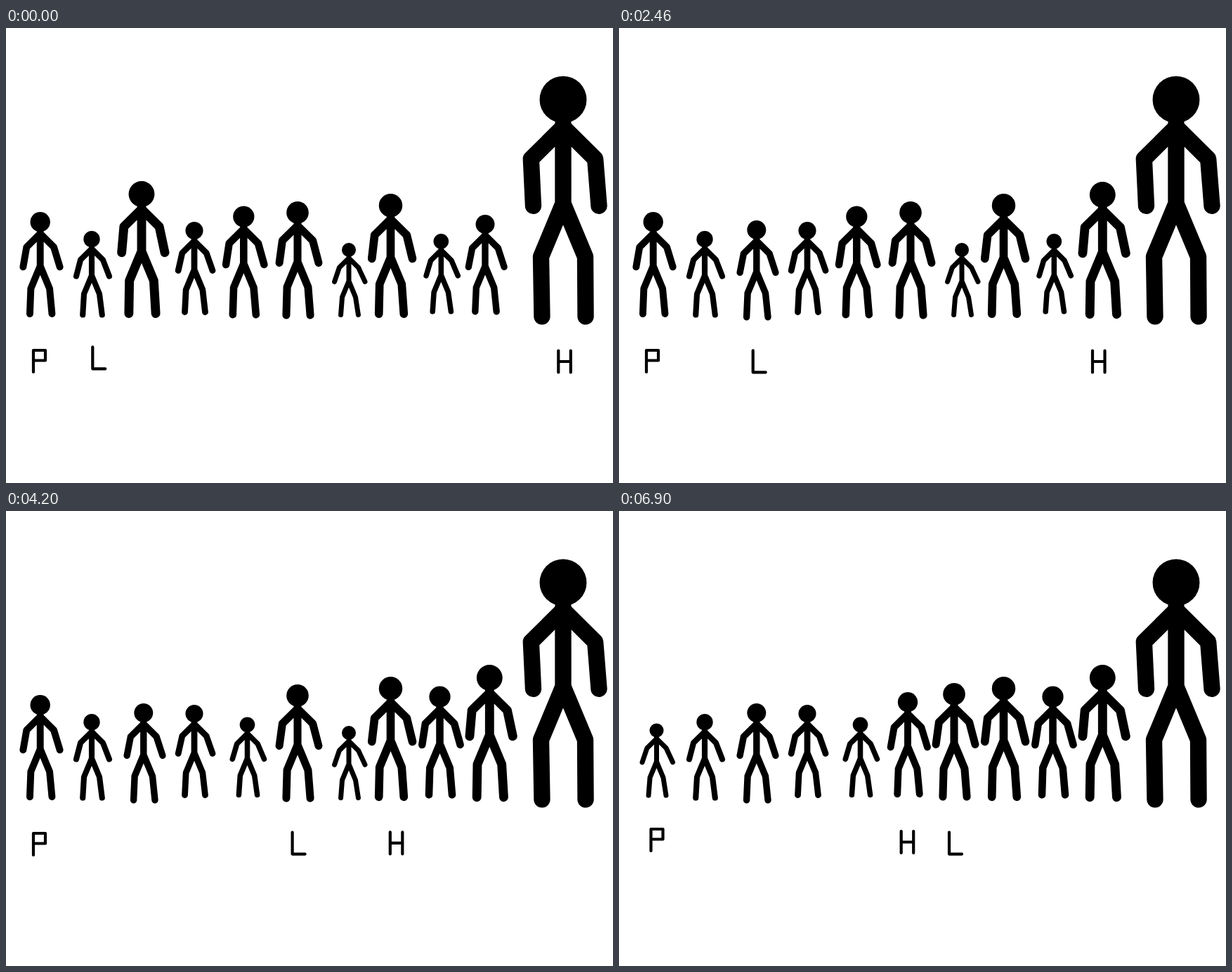
An HTML page for the animation above (8 s loop, 864 by 648 pixels).

```html
<!DOCTYPE html>
<html lang="en">
<head>
<meta charset="utf-8">
<title>Partition</title>
<style>
  html, body { margin: 0; width: 100%; height: 100%; overflow: hidden; background: #fff; }
  svg { display: block; width: 100vw; height: 100vh; }
  path { fill: none; stroke: #000; stroke-linecap: round; stroke-linejoin: round; }
  .letter { stroke-width: 4.2; }
</style>
</head>
<body>
<svg id="stage" viewBox="0 0 864 648"></svg>
<script>
const STEP = 60, LOOP = 8000, LAST_STEP = 115;
const stage = document.getElementById('stage');

function add(parent, tag, attrs) {
  const el = document.createElementNS('http://www.w3.org/2000/svg', tag);
  for (const key in attrs) el.setAttribute(key, attrs[key]);
  parent.appendChild(el);
  return el;
}

const clamp = v => Math.max(0, Math.min(1, v));
const mix = (a, b, t) => a + (b - a) * t;
const smooth = t => t * t * (3 - 2 * t);
const progress = (step, start, end) => clamp((step - start) / (end - start));

// One person: limbs follow from the height; small people spread theirs wider.
function drawPerson(h) {
  const group = add(stage, 'g', {});
  const arm = (side, hand) => `M0 ${.205 * h}L${side * .129 * h} ${.333 * h}L${hand} ${.522 * h}`;
  const leg = (side, foot) => `M0 ${.513 * h}L${side * .089 * h} ${.727 * h}L${foot} ${.967 * h}`;
  add(group, 'circle', { cy: .0945 * h, r: .0945 * h });
  add(group, 'path', {
    'stroke-width': .066 * h,
    d: `M0 ${.19 * h}V${.513 * h}`
      + arm(-1, -11 - .089 * h) + arm(1, 11 + .113 * h)
      + leg(-1, -3.5 - .075 * h) + leg(1, 5.5 + .075 * h)
  });
  return group;
}

const person = (x, top, height, ...hops) => ({ x, top, hops, el: drawPerson(height) });

// A swap lasts from start to end; rise is the share of it spent going up.
const swap = (start, end, rise) => (x, top, lift, wait) => ({ start, end, rise, x, top, lift, wait });
const swap1 = swap(31, 41, .5);
const swap2 = swap(49.2, 64, .5);
const swap3 = swap(75, 85, .5);
const swap4 = swap(91, 112, .38);

const people = [
  person(48.7, 262, 150, swap4(411, 258, 141, .075)),
  person(122, 289, 123.5),
  person(193, 218, 195, swap1(688.3, 219, 161, .2)),
  person(268, 276, 133),
  person(338.3, 253.5, 160, swap2(617.5, 249.5, 187, .13)),
  person(415, 247, 167.5, swap3(477, 245, 85, .13)),
  person(488, 306, 106, swap3(409.5, 301, 85, .13), swap4(53.5, 302.5, 138, .13)),
  person(547.5, 236, 177),
  person(619.3, 293, 114.5, swap2(343.5, 293.5, 166, .13)),
  person(682, 266, 142.5, swap1(195.8, 274, 176, .2)),
  person(793, 68.5, 354)
];

function personAt({ x, top, hops }, step) {
  for (const hop of hops) {
    const t = progress(step, hop.start, hop.end);
    const across = smooth(progress(t, hop.wait, 1 - hop.wait));
    const lift = Math.sin(Math.PI / 2 * Math.min(1, t / hop.rise, (1 - t) / hop.rise));
    x = mix(x, hop.x, across);
    top = mix(top, hop.top, t) - hop.lift * lift;
  }
  return [x, top];
}

// A letter walks at a steady pace during each of its moves.
const move = (start, end, dx, dy = 0) => ({ start, end, dx, dy });
const letter = (d, x, y, ...moves) =>
  ({ x, y, moves, el: add(stage, 'path', { class: 'letter', d }) });

const letters = [
  letter('M0 31V0H17V14.5H0', 39, 459, move(91, 115, 6.5, -6)),
  letter('M0 0V31H18', 123.3, 454.3,
    move(0, 14, 67.4, 5), move(41, 48, 142.5, -1.7), move(64, 70, 74.4), move(85, 91, 62.4)),
  letter('M0 0V31M17.5 0V31M0 15.5H17.5', 786.3, 459.5,
    move(14, 30, -112.3), move(41, 44, -56.5, -1), move(64, 75, -129.6, -2),
    move(85, 95, -88.2, 1), move(99, 115, 2, -1.5))
];

function letterAt({ x, y, moves }, step) {
  for (const { start, end, dx, dy } of moves) {
    const t = progress(step, start, end);
    x += dx * t;
    y += dy * t;
  }
  return [x, y];
}

function render(time) {
  const step = Math.min(LAST_STEP, Math.floor((time % LOOP) / STEP));
  const place = (el, at) => el.setAttribute('transform', `translate(${at})`);
  for (const p of people) place(p.el, personAt(p, step));
  for (const l of letters) place(l.el, letterAt(l, step));
}

let origin;
function tick(now) {
  origin ??= now;
  render(now - origin);
  requestAnimationFrame(tick);
}
render(0);
requestAnimationFrame(tick);
</script>
</body>
</html>
```
